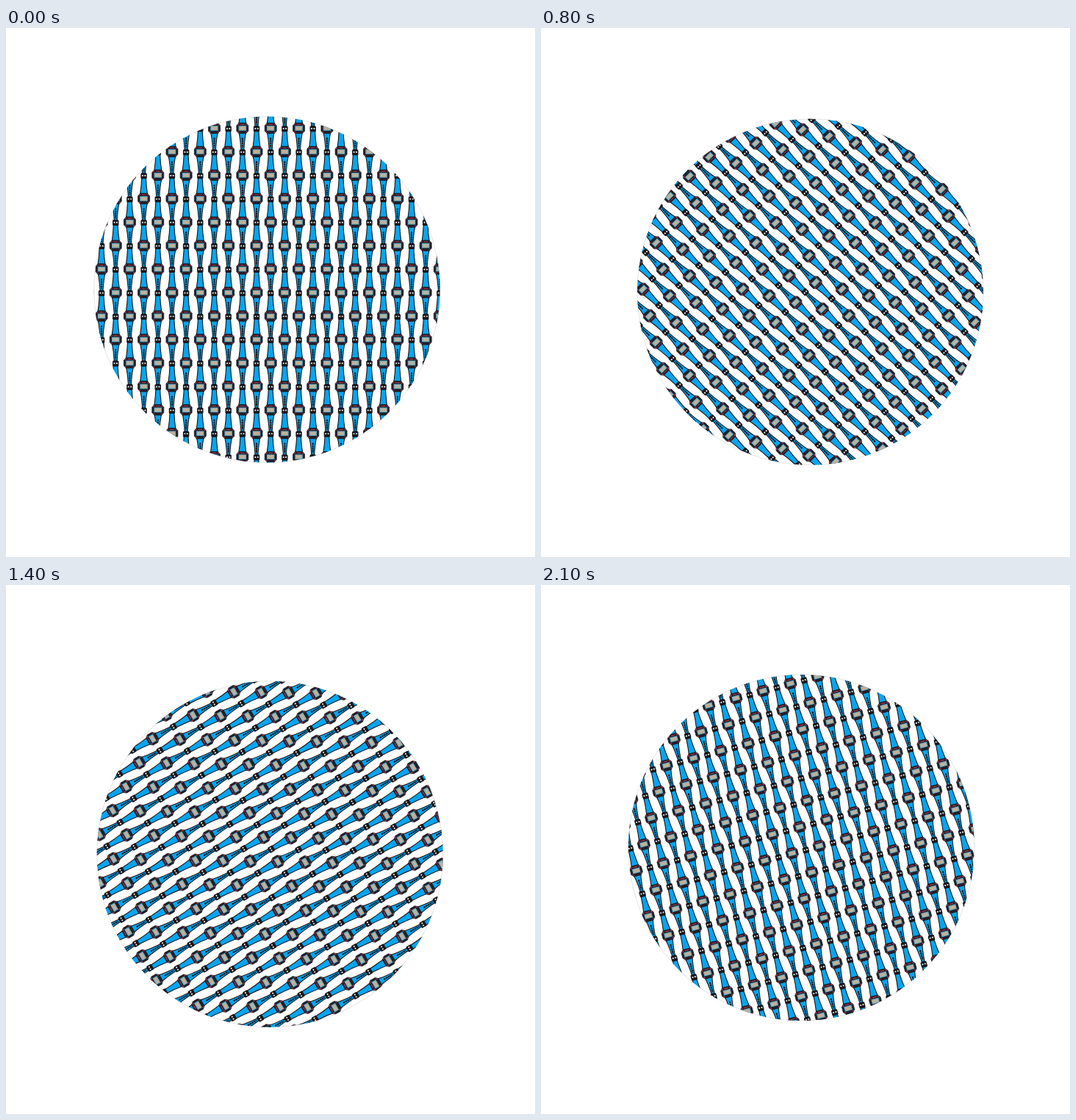
An HTML page that plays this animation: 720x720 px, repeating every 2.2 s.

```html
<!DOCTYPE html>
<html lang="en">
<head>
<meta charset="utf-8">
<title>Watch pattern</title>
<style>
  html, body { margin: 0; width: 100%; height: 100%; overflow: hidden; background: #fff; }
  svg { display: block; width: 100vw; height: 100vh; }
</style>
</head>
<body>
<svg viewBox="0 0 720 720">
  <defs>
    <clipPath id="round"><circle cx="-5" cy="-4" r="235.5"/></clipPath>
    <g id="watch">
      <g fill="#05a5ef" stroke="#15151a" stroke-width="1.1">
        <path d="M-2.9 -28L2.9 -28Q3.4 -16 5 -6L-5 -6Q-3.4 -16 -2.9 -28Z"/>
        <path d="M-4.9 6L4.9 6Q2.9 14 2 29L-2 29Q-2.9 14 -4.9 6Z"/>
      </g>
      <path d="M0 13V27" stroke="#15151a" stroke-width="2" stroke-dasharray="2.6 .6"/>
      <rect x="-4.2" y="-35" width="8.4" height="8" rx="1.5" fill="#17171c"/>
      <path d="M-2.6 -31.4h1.8M.8 -31.4h1.8" stroke="#fff" stroke-width="1.7"/>
      <path d="M-4.8 -7.2H4.8L8 -3.6V3.8L4.8 7.2H-4.8L-8 3.8V-3.6Z" fill="#20202a" stroke="#15151a" stroke-width=".7"/>
      <path d="M-6.8 -3.6L-4.4 -6M6.8 -3.6L4.4 -6M-6.6 4L-4.6 6M6.6 4L4.6 6M-2.8 -5.1H2.8" fill="none" stroke="#cf3e58" stroke-width=".9"/>
      <rect x="-5.2" y="-3.2" width="10.4" height="6.6" fill="#55b6d8"/>
      <rect x="-3.8" y="-1.9" width="7.6" height="4" fill="#b9b5a0" stroke="#d99a74" stroke-width=".6"/>
    </g>
  </defs>
  <g id="disc">
    <circle cx="-5" cy="-4" r="235.5" fill="#fff" stroke="#d4d4d4" stroke-width=".6"/>
    <g id="watches" clip-path="url(#round)"></g>
  </g>
</svg>
<script>
const disc = document.getElementById('disc');
const columnGap = 19.18, watchGap = 63.9;

// Every second column is shifted by half a watch.
let uses = '';
for (let col = -13; col <= 13; col++) {
  const shift = col % 2 ? 0 : watchGap / 2;
  for (let row = -5; row <= 5; row++) {
    uses += `<use href="#watch" x="${col * columnGap}" y="${row * watchGap + shift}"/>`;
  }
}
document.getElementById('watches').innerHTML = uses;

// 15 degrees per step; the first step of each half turn is doubled.
function draw(now) {
  const step = Math.floor(now / 100) % 22;
  const angle = 15 * (step + (step > 0) + (step > 11));
  disc.setAttribute('transform', `translate(360.2 360) rotate(${angle})`);
}

const start = performance.now();
function tick() {
  draw(performance.now() - start);
  requestAnimationFrame(tick);
}
tick();
</script>
</body>
</html>
```
